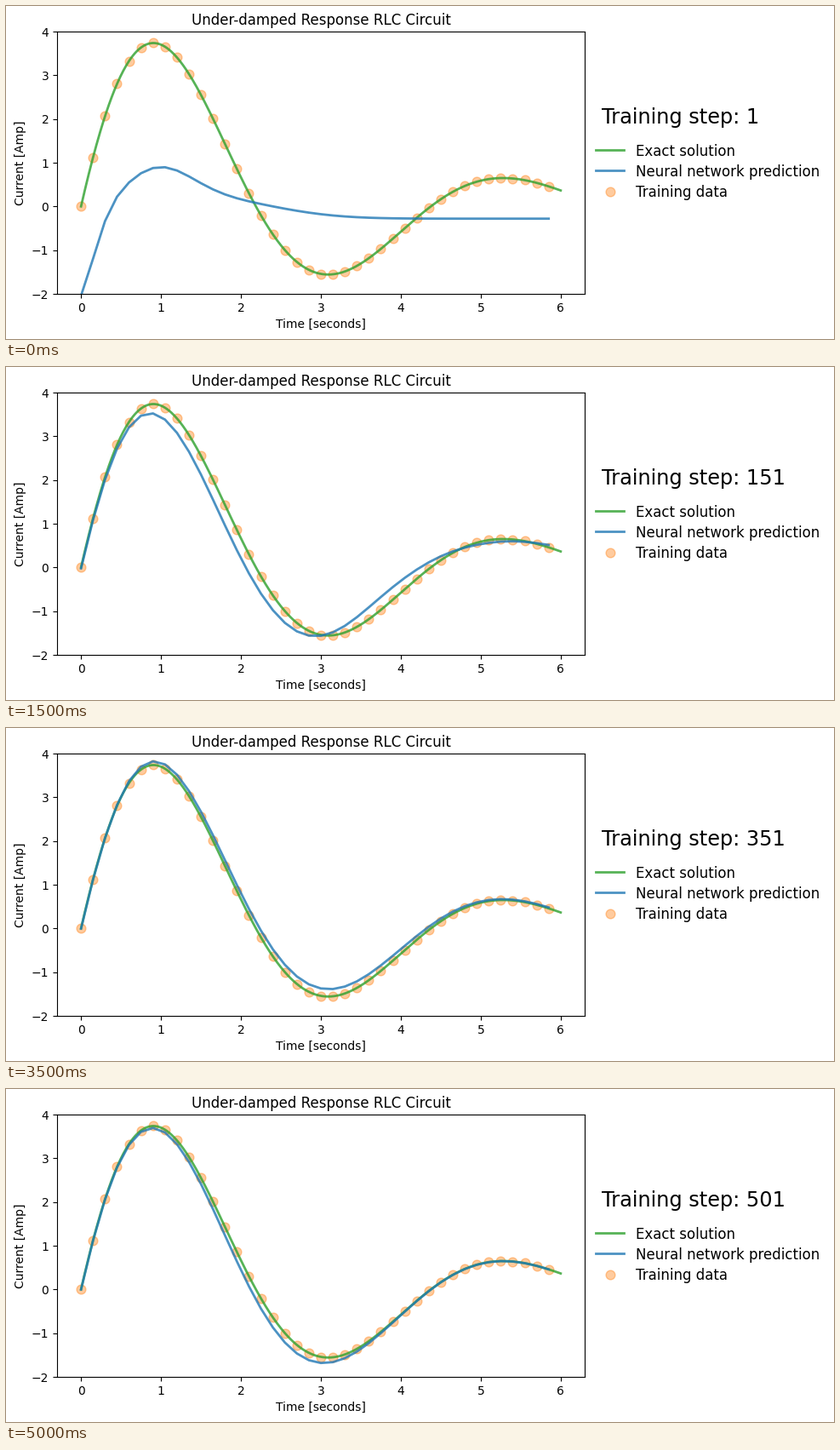
Recreate the animation shown at these times as a matplotlib script. Size 973 px wide and 391 px high, loop 5.5 s.

```python
import numpy as np
import matplotlib.pyplot as plt
from matplotlib.animation import FuncAnimation

W, H, DPI = 973, 391, 100
SHOTS, EVERY = 11, 50

# Series RLC circuit, step voltage
R, L, C, V = 1.2, 1.5, 0.3, 12
DECAY = R / (2 * L)
OMEGA = np.sqrt(1 / (L * C) - DECAY**2)


def current(t):
    return V / (L * OMEGA) * np.exp(-DECAY * t) * np.sin(OMEGA * t)


def bump(x, centre, width):
    return np.exp(-((x - centre) / width) ** 2)


def untrained(t):
    """Single hump that settles just below zero."""
    return (0.45 * bump(t, 1.6, 1.15) + 0.85 * bump(t, 0.93, 0.62)
            - 2.1 * bump(t, -0.1, 0.33) - 0.28)


def prediction(k, t):
    """Network output at snapshot k: the solution plus four fading errors."""
    if k == 0:
        return untrained(t)
    lag = -0.24 - 0.34 * bump(k, 2.5, 0.8)        # falls too early
    shallow = 0.37 / (1 + np.exp((k - 4) / 0.6))  # trough not deep enough
    late = 0.28 * 0.58 ** (k - 1)                 # second crest comes late
    kick = 1.6 * bump(k, 8, 0.84)                 # one unstable stretch
    return (current(t)
            + lag * bump(t, 1.65 + 0.06 * k, 1.05)
            + shallow * bump(t, 3.75, 0.75)
            + late * (bump(t, 6.1, 0.38) - 0.8 * bump(t, 5.05, 0.5))
            + kick * (1 - bump(t, 0, 0.65)) / np.cosh((t - 2.2) / 0.93))


t_fine = np.linspace(0, 6, 500)
t_data = np.arange(40) * 0.15

fig = plt.figure(figsize=(W / DPI, H / DPI), dpi=DPI, facecolor="white")
ax = fig.add_axes([60 / W, 53 / H, 620 / W, 308 / H])
ax.plot(t_fine, current(t_fine), color="tab:green", lw=2, alpha=0.8,
        label="Exact solution")
line, = ax.plot(t_data, prediction(0, t_data), color="tab:blue", lw=2, alpha=0.8,
                label="Neural network prediction")
ax.scatter(t_data, current(t_data), s=60, color="tab:orange", alpha=0.4,
           label="Training data")
ax.set(xlim=(-0.3, 6.3), ylim=(-2, 4), xlabel="Time [seconds]",
       ylabel="Current [Amp]", title="Under-damped Response RLC Circuit")
legend = ax.legend(loc=(1.01, 0.34), frameon=False, fontsize="large",
                   labelspacing=0.36)
for text in legend.get_texts():
    text.set_y(-1.5)  # centre the words on their handles
step = ax.text(6.515, 1.9, "", fontsize="xx-large", color="k")


def update(k):
    line.set_ydata(prediction(k, t_data))
    step.set_text(f"Training step: {k * EVERY + 1}")
    return line, step


anim = FuncAnimation(fig, update, frames=SHOTS, interval=500, repeat=True,
                     repeat_delay=0, blit=False)
plt.show()
```
